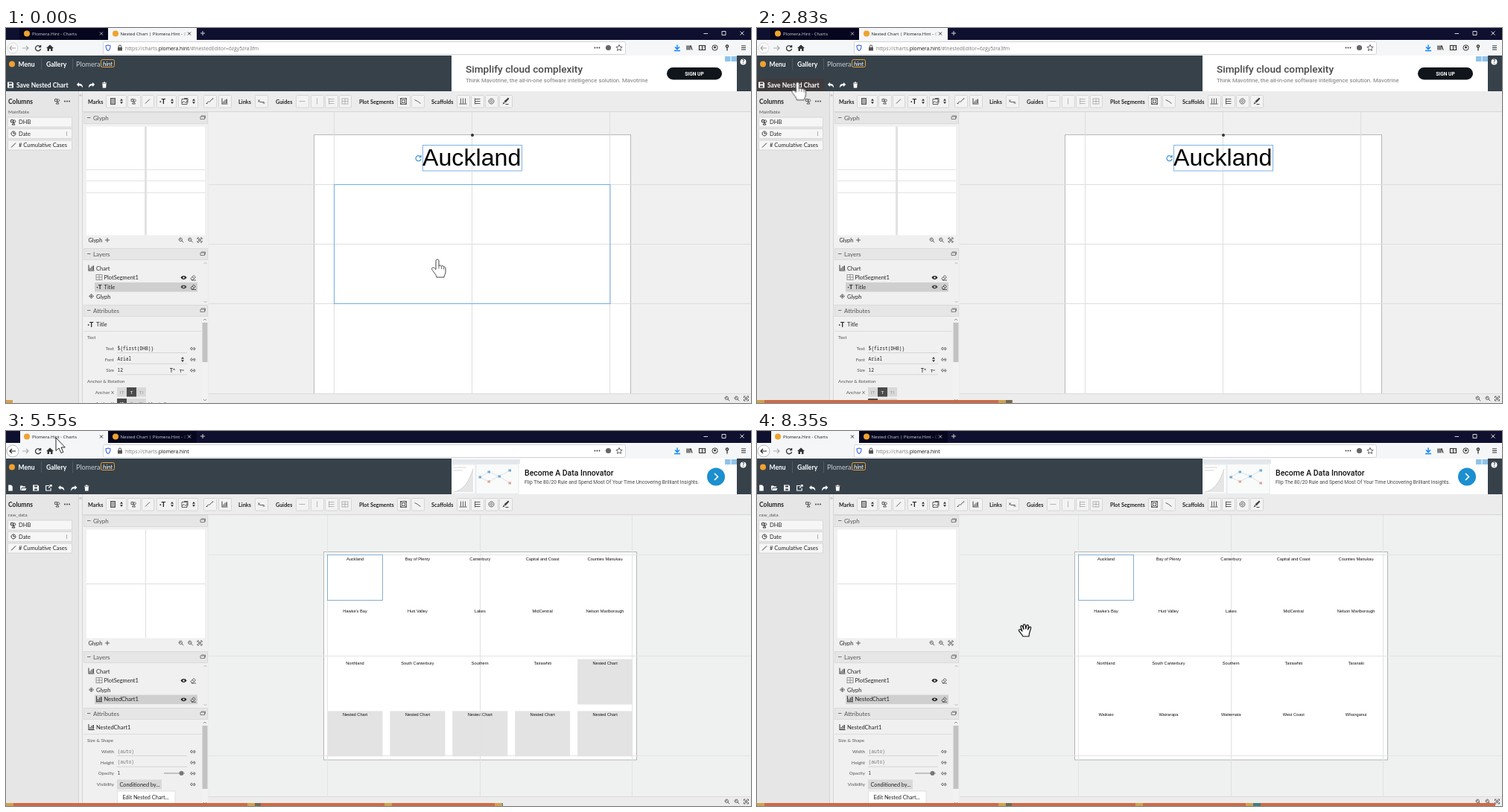
These frames come from a looping animation (1000 by 504 pixels, 8430 ms). An HTML page:

```html
<!DOCTYPE html>
<html lang="en">
<head>
<meta charset="utf-8">
<title>Nested chart editor</title>
<style>
html, body { margin: 0; width: 100%; height: 100%; overflow: hidden; background: #efefef; }
#stage { position: absolute; left: 0; top: 0; width: 1000px; height: 504px; overflow: hidden; }
svg { display: block; }
text { font-family: Lato, sans-serif; white-space: pre; }
.b { font-weight: 700; }
.o { font-family: "Open Sans", sans-serif; }
.r { font-family: Roboto, sans-serif; }
.rm { font-family: Roboto, sans-serif; font-weight: 500; }
.m { font-family: "Noto Sans Mono", monospace; }
.a { font-family: "Liberation Sans", Arial, sans-serif; }

/* hard switches */
.sw { animation: 8.43s step-end infinite; }
.editor { animation-name: editor; }
.overview { animation-name: overview; }
.plot { animation-name: plot; }
.saveHover { animation-name: saveHover; }
.galleryHover { animation-name: galleryHover; }
.tabHover { animation-name: tabHover; }
.click { animation-name: click; }
.chevron { animation-name: chevron; }
.waiting { animation-name: waiting; }
.filled { animation-name: filled; }
.pointer { animation-name: pointer; }
.grab { animation-name: grab; }
.arrow { animation-name: arrow; }
@keyframes editor { 0% { visibility: visible } 64.77%, 100% { visibility: hidden } }
@keyframes overview { 0% { visibility: hidden } 64.77%, 100% { visibility: visible } }
@keyframes plot { 0% { visibility: visible } 10.6%, 100% { visibility: hidden } }
@keyframes saveHover { 0%, 34.8%, 100% { visibility: hidden } 17.6% { visibility: visible } }
@keyframes galleryHover { 0%, 56.1%, 100% { visibility: hidden } 36.4% { visibility: visible } }
@keyframes tabHover { 0%, 64.77%, 100% { visibility: hidden } 58.9% { visibility: visible } }
@keyframes click { 0%, 64.77%, 100% { visibility: hidden } 62.9% { visibility: visible } }
@keyframes chevron { 0%, 78.9%, 100% { visibility: hidden } 75.9% { visibility: visible } }
@keyframes waiting { 0%, 66.8%, 100% { visibility: hidden } 64.77% { visibility: visible } }
@keyframes filled { 0% { visibility: hidden } 66.8%, 100% { visibility: visible } }
@keyframes pointer { 0%, 17.6% { visibility: visible } 10.6%, 56.1%, 100% { visibility: hidden } }
@keyframes grab { 0%, 13.1% { visibility: hidden } 10.6%, 80.8%, 100% { visibility: visible } }
@keyframes arrow { 0%, 17.6%, 80.8%, 100% { visibility: hidden } 13.1%, 56.1% { visibility: visible } }

#cursor { animation: travel 8.43s ease-in-out infinite; }
@keyframes travel {
  0%, 5.93% { transform: translate(579px, 311px) }
  18.98%, 32.03% { transform: translate(54px, 75px) }
  39.7%, 53.4% { transform: translate(59px, 48px) }
  61.1% { transform: translate(67px, 9px) }
  73.1% { transform: translate(67px, 9px); animation-timing-function: ease-in }
  77.7% { transform: translate(175px, 73px); animation-timing-function: linear }
  82.9% { transform: translate(338px, 247px); animation-timing-function: ease-out }
  86.6%, 100% { transform: translate(360px, 268px) }
}
#bar {
  position: absolute; left: 0; top: 500px; height: 4px;
  background: linear-gradient(90deg, #d2a04c 10px, #cd6a47 10px 324px, #d2a04c 324px 334px,
    #6f6a50 334px 342px, #cd6a47 342px 508px, #d2a04c 508px 518px, #cd6a47 518px 656px,
    #d2a04c 656px 666px, #3f7f7c 666px 676px, #cd6a47 676px) 0 0 / 1000px 4px no-repeat;
  animation: progress 8.43s steps(108, jump-start) infinite;
}
@keyframes progress { from { width: 0 } to { width: 1000px } }
</style>
</head>
<body>
<div id="stage"><div id="bar"></div></div>
<script>
const rect = (x, y, w, h, fill, stroke = 'none', rx = 0) =>
  `<rect x="${x}" y="${y}" width="${w}" height="${h}" rx="${rx}" fill="${fill}" stroke="${stroke}"/>`;
const text = (x, y, s, size, fill = '#222', cls = '', anchor = 'start') =>
  `<text x="${x}" y="${y}" font-size="${size}" fill="${fill}" class="${cls}" text-anchor="${anchor}">${s}</text>`;
const dot = (x, y, r, fill, stroke = 'none') => `<circle cx="${x}" cy="${y}" r="${r}" fill="${fill}" stroke="${stroke}"/>`;
const line = (d, c, w = 1, fill = 'none') => `<path d="${d}" stroke="${c}" stroke-width="${w}" fill="${fill}"/>`;
const solid = (d, c) => `<path d="${d}" fill="${c}"/>`;
const at = (x, y, s) => `<g transform="translate(${x} ${y})">${s}</g>`;
const group = (cls, ...parts) => `<g class="sw ${cls}">${parts.join('')}</g>`;
const each = (list, fn) => list.map(fn).join('');

const outlines = {
  back: 'M4 0H-4M-1-3L-4 0L-1 3', forward: 'M-4 0H4M1-3L4 0L1 3',
  reload: 'M3-2A3.6 3.6 0 1 0 3.6 1M3.6-4V-1.4H1', close: 'M-2-2L2 2M2-2L-2 2',
  plus: 'M-3 0H3M0-3V3', menu: 'M-3-2.5H3M-3 0H3M-3 2.5H3',
  shield: 'M0-3.5L3-2.5C3 1 2 3 0 4C-2 3-3 1-3-2.5Z', star: 'M0-4L1.2-1.3L4-1L2 1L2.5 3.8L0 2.4L-2.5 3.8L-2 1L-4-1L-1.2-1.3Z',
  down: 'M0-4V2M-3-1L0 2L3-1M-4 4H4', books: 'M-3-3V3M-1-3V3M1-3V3M2-3L4 3', side: 'M-4-3H4V3H-4ZM0-3V3M2-1H3',
  key: 'M0-3.5A1.6 1.6 0 1 1-.1-3.5M0-.4V4', restore: 'M-3-1.5H2.5V2H-3ZM-2-2.5H3.5V1',
  zoom: 'M1.5-1A2.2 2.2 0 1 1 1.4-1.4M.9.9L3.3 3.3M-2-1H.2', fit: 'M-3-1V-3H-1M1-3H3V-1M3 1V3H1M-1 3H-3V1M-1.2-1.2H1.2V1.2H-1.2Z',
  link: 'M-1-1.5A1.6 1.6 0 1 0-1 1.3M.6-1.3A1.6 1.6 0 1 1 .6 1.5M-2 0H2', eraser: 'M-3 1L1-3L3.4-.6L0 3H-2ZM-1-1L1.5 1.2M-2 3.5H4',
  shapes: 'M-3.5-3H-.5V0H-3.5ZM2.8-1.5A1.6 1.6 0 1 1 2.7-1.8M-2 3.5L0 .5L2 3.5Z', slash: 'M-3 3L3-3',
  clock: 'M3 0A3 3 0 1 1 3-.1M0-2V0H2', path: 'M-4 3C-2-2 0 3 1-1L4-3M-5 3H-3M3-3.5H5',
  scatter: 'M-4-2L-2 1H4M-4 1L-2-2M2 2.5H5', diamond: 'M0-3L3 0L0 3L-3 0ZM-2 0H2M0-2V2',
  hGuide: 'M-4 0H4', vGuide: 'M0-4V4', grid: 'M-4-3.5H4M-4 0H4M-4 3.5H4M-4-4V4M0-4V4M4-4V4', rows: 'M-3-4V4M-3-3H4M-3 0H4M-3 3H4',
  cols: 'M-5 3.5H5M-3-4V3M0-4V3M3-4V3', curve: 'M-4-2L0 0L4 3', rings: 'M3.5 0A3.5 3.5 0 1 1 3.5-.1M1.5 0A1.5 1.5 0 1 1 1.5-.1',
  box: 'M-4-4H4V4H-4ZM-2-2H2V2H-2ZM-4-4L-2-2M4-4L2-2M-4 4L-2 2M4 4L2 2',
  picture: 'M-4-3H3V4H-4ZM-4 2L-1 0L1 2L3 0M-1-4H4V2', send: 'M1-3H-3.500V3.500H3V0M0 0L4-4M1.500-4H4V-1.500'
};
const solids = {
  home: 'M-5 0L0-4.5L5 0H3.5V4H1V1H-1V4H-3.5V0Z', lock: 'M-3-.5H-2V-2A2 2 0 0 1 2-2V-.5H3V4H-3ZM-1-.5H1V-2A1 1 0 0 0-1-2Z',
  save: 'M-4-4H2.5L4-2.5V4H-4ZM-2-3V-1H2V-3ZM-2 1V3H2V1Z', undo: 'M-4.2-.6L-1-3.6V-1.8C3-1.8 4.4 1 4 4C3 1.5 1 .8-1 .8V2.6Z',
  redo: 'M4.2-.6L1-3.6V-1.8C-3-1.8-4.4 1-4 4C-3 1.5-1 .8 1 .8V2.6Z', trash: 'M-3-3H-1V-4H1V-3H3V-2H-3ZM-2.6-1.4H2.6L2.2 4H-2.2Z',
  file: 'M-2.8-4H.8L2.8-2V4H-2.8Z', open: 'M-4-3H-1L0-2H3V-.5H-2L-3.4 3H-4ZM-1.5.4H4.5L3 3.4H-3Z',
  chart: 'M-4-4H-3V3H4V4H-4ZM-2 0H-1V2.4H-2ZM0-2H1V2.4H0ZM2-3H3.4V2.4H2Z',
  brush: 'M3.500-5L5-3.500L0 2L-2 0ZM-2.500.8L-.6 2.600L-4 4ZM0 3.500H4V4.500H0Z',
  sort: 'M0-3.4L2-.7H-2ZM0 3.4L2 .7H-2Z', eye: 'M-4 0C-2-3.2 2-3.2 4 0C2 3.2-2 3.2-4 0M-1.2 0A1.2 1.2 0 1 0 1.2 0A1.2 1.2 0 1 0-1.2 0Z'
};
const icon = (name, x, y, c = '#444', w = .85) => at(x, y,
  solids[name] ? `<path d="${solids[name]}" fill="${c}" fill-rule="evenodd"/>` : line(outlines[name], c, w));
const dots = (x, y, c = '#333') => each([-3, 0, 3], d => dot(x + d, y, .9, c));
const mark = (x, y) => dot(x, y, 4, '#efa22f');

const site = 'plomera.hint';
const tabTitle = 'Plomera.Hint - Charts';

function tabs(first) {
  const ink = on => on ? '#1a1a24' : '#d4d4dc';
  return rect(first ? 19 : 137, 0, first ? 118 : 119, 16.5, '#f5f6f7') +
    mark(28, 7.5) + mark(147, 7.5) +
    text(35, 10, tabTitle, 6, ink(first), 'o') +
    text(153.5, 10, 'Nested Chart | Plomera.Hint - <tspan opacity=".4">C</tspan>', 6, ink(!first), 'o') +
    icon('close', 128, 7.5, ink(first)) + icon('close', 246, 7.5, ink(!first)) +
    (first ? dot(9, 27, 8, '#fff', '#bbb') : dot(9, 27, 7, '#f9f9fa', '#ddd')) +
    icon('back', 9, 27, first ? '#222' : '#aaa', 1.2) +
    text(160, 29.5, `https://charts.<tspan fill="#111">${site}</tspan>${first ? '' : '/#!nestedEditor=6zgy5zra3fm'}`, 6.82, '#777', 'o');
}

function chrome() {
  return rect(0, 0, 1000, 17, '#0f1030') + rect(18, 0, 238, 16, '#06061f') + rect(0, 16, 1000, 21, '#f5f6f7') +
    icon('plus', 264, 7, '#eee') + line('M936.5 7.5H942M961 4.5H966V9.5H961ZM985.5 4.5L990.5 9.5M990.5 4.5L985.5 9.5', '#eee', .9) +
    icon('forward', 26, 27, '#aaa', 1.2) + icon('reload', 43, 27, '#333', 1.3) + icon('home', 59, 27, '#333') +
    rect(130.5, 18.5, 701, 17, '#fff', '#d4d4d8', 2) + icon('shield', 137, 26.5, '#3a64d8', 1.1) + icon('lock', 153, 26.5, '#555') +
    dots(793.5, 26.5) + dot(808.5, 26.5, 3.6, '#666') + icon('star', 823, 26.5, '#444') +
    icon('down', 901, 26.5, '#0a84ff', 1.4) + icon('books', 917, 26.5, '#333', 1.2) + icon('side', 934.5, 26.5, '#333', 1.2) +
    dot(951.5, 26.5, 3.6, 'none', '#333') + dot(951.5, 26, 1.5, '#333') + icon('key', 968, 26.5, '#333', 1.3) + icon('menu', 990, 26.5, '#333', 1.2);
}

function header() {
  return rect(0, 37, 1000, 48, '#36414a') + mark(8, 48.5) + text(16.5, 51.5, 'Menu', 8.5, '#fff', 'b') +
    group('galleryHover', rect(47, 37, 43, 22, '#00a7e1')) +
    text(54, 51.5, 'Gallery', 8.6, '#fff', 'b') + line('M47.5 41V56M89.5 41V56', '#56616a', .8) +
    text(94, 52, 'Plomera.', 9, '#c9d0d4') + rect(127.5, 42.5, 18, 10, 'none', '#e7a13a', 2) +
    `<text x="130" y="51" font-size="8" fill="#fff" font-style="italic">hint</text>` +
    dot(989.5, 45.5, 4, '#fff') + text(989.5, 48.2, '?', 7, '#333', 'b', 'middle');
}

function panels() {
  const head = (y, s) => rect(104.5, y, 166, 15, '#e6e6e6', '#dadada') + line(`M109 ${y + 7}H113.5`, '#666', .9) +
    text(117, y + 10.4, s, 8, '#555') + icon('restore', 264, y + 7, '#666', .8);
  const fields = [[126.5, 'DHB', 'shapes'], [142, 'Date', 'clock'], [157.5, '# Cumulative Cases', 'slash']];
  return rect(0, 85, 1000, 419, '#ececec') + rect(0, 85, 97, 419, '#e6e6e6') + rect(97, 85, 5, 419, '#efefef') +
    line('M97.5 85V504M102.5 85V504', '#d4d4d4') + line('M98.5 91L100 89L101.5 91Z', '#999', .5) +
    text(3, 102, 'Columns', 8.5, '#222', 'b') + icon('shapes', 69, 98.5) + dots(82, 98.5) +
    each(fields, ([y, s, i]) => rect(2.5, y - 6.5, 86, 13, '#f6f6f6', '#d8d8d8') + icon(i, 10, y, '#333', 1) + text(17, y + 2.7, s, 7.55)) +
    each([-2, 0, 2], d => dot(81.5, 142 + d, .6, '#555')) +
    rect(103, 112, 168, 392, '#f0f0f0') + head(113.5, 'Glyph') + head(296.5, 'Layers') + head(372.5, 'Attributes') +
    rect(108, 132.5, 159, 146, '#fff') + text(110.5, 287.5, 'Glyph', 7.2) + icon('plus', 136, 285, '#444') +
    icon('zoom', 235, 285) + icon('zoom', 247.5, 285) + icon('fit', 260, 285) +
    line('M265.5 317L267.5 315L269.5 317M265.5 367L267.5 369L269.5 367', '#aaa', .8) +
    rect(263, 388, 8, 116, '#f2f2f2') +
    line('M265 393L267 391L269 393M265 499L267 501L269 499', '#777', .8) + line('M104 407.5H262', '#d8d8d8', .8);
}
const thumb = h => rect(263.5, 396, 7, h, '#c2c2c2');

function toolbar() {
  const labels = [[110, 'Marks'], [312, 'Links'], [362, 'Guides'], [474, 'Plot Segments'], [571, 'Scaffolds']];
  const buttons = [[134, 27], [163, 17, 'shapes'], [182, 16, 'slash'], [202, 26], [231, 26, 'picture'], [265, 17, 'path'],
    [285, 17, 'chart'], [334, 17, 'scatter'], [389, 17, 'hGuide'], [409, 17, 'vGuide'], [428, 17, 'rows'], [447, 16, 'grid'],
    [525, 17, 'box'], [544, 17, 'curve'], [605, 17, 'cols'], [624, 17, 'rows'], [643, 17, 'rings'], [662, 17, 'brush']];
  const guide = x => x > 380 && x < 470;
  return rect(103, 85, 897, 27.5, '#ececec') + line('M103 112.5H1000', '#d6d6d6') +
    each(labels, ([x, s]) => text(x, 101.5, s, 7.3, '#222', 'b')) +
    each(buttons, ([x, w, i]) => rect(x + .5, 90.5, w, 16.5, '#f3f3f3', '#d6d6d6', 1) +
      (i ? icon(i, x + (w > 20 ? 9 : w / 2), 98.5, guide(x) ? '#aaa' : '#444') : '') +
      (w > 20 ? icon('sort', x + 21, 98.5, '#333') : '')) +
    rect(140.5, 94.5, 6, 8, '#aaa', '#555') + text(206, 102, '·T', 9.5, '#222', 'b');
}

const layer = (x, y, s, i, tools) => icon(i, x - 6.5, y - .5, i === 'grid' ? '#777' : '#333', .7) + text(x, y + 2.5, s, 7.5) +
  (tools ? icon('eye', 238.5, y, '#222') + icon('eraser', 251, y, '#444') : '');
const selected = y => rect(119, y - 6.2, 138, 12.5, '#cfcfcf');
const prop = (y, label, value, under = true) => text(145, y, label, 6.2, '#555', '', 'end') + text(149.5, y - .3, value, 6.25, '#222', 'm') +
  (under ? line(`M149 ${y + 3.5}H243`, '#cfcfcf', .8) : '') + icon('link', 251, y - 2, '#444', .8);
const choice = (y, on) => rect(149, y, 39, 12.5, '#d9d9d9') + rect(149 + 13 * on, y, 13, 12.5, '#4a4a4a') +
  each(['IT', 'T', 'TI'], (s, i) => text(155.5 + 13 * i, y + 9, s, 6.5, i === on ? '#fff' : '#999', '', 'middle'));

function editorPanels() {
  return icon('save', 6, 76.5, '#fff') + text(14, 79.7, 'Save Nested Chart', 8.45, '#fff', 'b') +
    icon('undo', 99, 76.5, '#fff') + icon('redo', 115, 76.5, '#fff') + icon('trash', 132, 76.5, '#fff') +
    text(3, 115, 'MainTable', 6.4, '#555') + thumb(53) +
    rect(186, 132.5, 3, 146, '#e2e2e2') + line('M108 190.5H267M108 205.5H267M108 221.5H267', '#e0e0e0', .9) +
    selected(348.2) + layer(121, 323, 'Chart', 'chart') + layer(131.5, 335.5, 'PlotSegment1', 'grid', 1) +
    text(121.5, 351.2, '·T', 8, '#222', 'b') + text(131.5, 350.7, 'Title', 7.5) + icon('eye', 238.5, 348) + icon('eraser', 251, 348) +
    layer(121, 361, 'Glyph', 'diamond') +
    text(109.5, 401.5, '·T', 9, '#222', 'b') + text(121, 401.3, 'Title', 7.5) + text(109, 418, 'Text', 6.2, '#555') +
    prop(433, 'Text', '${first(DHB)}') + prop(447.7, 'Font', 'Arial') + prop(462.3, 'Size', '12') +
    icon('sort', 237, 445.5, '#333') + text(220, 462.5, 'T˄', 6.5, '#333', 'b') + text(233, 462.5, 'T˅', 5.6, '#333', 'b') +
    text(109, 477, 'Anchor &amp; Rotation', 6.2, '#555') + text(145, 491.7, 'Anchor X', 6.2, '#555', '', 'end') +
    choice(483, 1) + choice(498, 0) +
    text(145, 506.5, 'Anchor Y', 6.2, '#555', '', 'end') + text(191, 506.5, 'Margin 0', 6.2, '#555');
}

function editorCanvas() {
  return rect(272, 113, 728, 378, '#f0f0f0') + rect(413.5, 143.5, 425, 360, '#fff', '#b8b8b8') +
    line('M440.5 113V491M625.5 113V491M810.5 113V491M272 210.5H1000M272 290.5H1000M272 370.5H1000', '#dedede') +
    group('plot', rect(440.5, 210.5, 370.5, 160, 'none', '#74ace4')) +
    dot(626, 144, 2, '#333') + rect(559.5, 157.5, 133, 34.5, '#fff', '#7fb3e6') + line('M625.5 158V192', '#e2e2e2') +
    text(559, 185.4, 'Auckland', 32.2, '#000', 'a') + icon('reload', 553.5, 175, '#3f96d8', 1.2);
}

function editorAd() {
  return rect(598, 37, 383, 48, '#fff') + text(617, 60, 'Simplify cloud complexity', 13.65, '#484848', 'rm') +
    text(617, 73, 'Think Mavotrine, the all-in-one software intelligence solution. Mavotrine', 7.75, '#777', 'r') +
    rect(887, 53, 74, 16.5, '#0f151b', 'none', 8.2) + text(924, 63.7, 'SIGN UP', 6.6, '#fff', 'r b', 'middle');
}

function overviewPanels() {
  const tools = ['file', 'open', 'save', 'send', 'undo', 'redo', 'trash'];
  return each(tools, (n, i) => icon(n, 6 + i * 17.05, 76.5, '#fff', 1.1)) + text(3, 115, 'raw_data', 6.4, '#555') + thumb(85) +
    line('M187.5 132.5V278M108 205.5H267', '#dcdcdc', .9) +
    selected(360.8) + layer(121, 323, 'Chart', 'chart') + layer(131.5, 335.5, 'PlotSegment1', 'grid', 1) +
    layer(121, 348.3, 'Glyph', 'diamond') + layer(131.5, 360.8, 'NestedChart1', 'chart', 1) +
    icon('chart', 114.5, 398, '#333') + text(121, 401.3, 'NestedChart1', 7.5) + text(109, 418, 'Size &amp; Shape', 6.2, '#555') +
    prop(433, 'Width', '<tspan fill="#777">(auto)</tspan>') + prop(447.7, 'Height', '<tspan fill="#777">(auto)</tspan>') +
    prop(462.3, 'Opacity', '1', false) + line('M212 460H240', '#888', .9) + dot(235.5, 460, 3, '#777') +
    prop(477, 'Visibility', '', false) + rect(149, 468.5, 60, 13, '#d9d9d9') + text(152.5, 477.7, 'Conditioned by...', 7.3) +
    rect(149.5, 484, 77.5, 22, '#fff', '#e0e0e0') + text(156.5, 494.7, 'Edit Nested Chart...', 7.3);
}

const places = ['Auckland', 'Bay of Plenty', 'Canterbury', 'Capital and Coast', 'Counties Manukau',
  'Hawke\'s Bay', 'Hutt Valley', 'Lakes', 'MidCentral', 'Nelson Marlborough',
  'Northland', 'South Canterbury', 'Southern', 'Tairawhiti', 'Taranaki',
  'Waikato', 'Wairarapa', 'Waitemata', 'West Coast', 'Whanganui'];

function overviewCanvas() {
  const ready = 14;
  const x = i => 431.5 + i % 5 * 83.9;
  const y = i => 167 + Math.floor(i / 5) * 69.8;
  const label = (i, s) => text(x(i) + 37, y(i) + 7, s, 5.65, '#111', 'a', 'middle');
  const late = places.slice(ready);
  return rect(272, 113, 728, 378, '#eff0f0') + rect(426.5, 162.5, 420, 279.5, '#fff', '#b4b4b4') +
    line('M431.5 113V491M840.5 113V491M272 166.5H1000M272 302.5H1000M272 436.5H1000', '#e2e5e5') +
    group('waiting', each(late, (s, i) => rect(x(i + ready), y(i + ready), 74, 61, '#e3e3e3') + label(i + ready, 'Nested Chart'))) +
    line('M636.5 113V491', '#dfe2e2') +
    each(places.slice(0, ready), (s, i) => label(i, s)) + group('filled', each(late, (s, i) => label(i + ready, s))) +
    rect(431.5, 166.5, 74, 61, 'none', '#86aed0');
}

function overviewAd() {
  const nodes = [[636, 62], [648, 55], [648, 68], [662, 61], [676, 53], [676, 70]];
  return rect(598, 37, 383, 48, '#fff') + rect(598, 38, 92, 6, '#e4e8ec') + rect(599, 45, 31, 39, '#fff', '#dfe1e3') +
    solid('M601 82C612 80 620 72 627 51V82Z', '#e6e6e6') + line('M601 82C612 80 620 72 627 51M601 49H618M601 53H613', '#bbb', .6) +
    rect(631, 44.5, 57, 40, '#f9fafa', '#e6eaed') +
    line('M636 62L648 55L662 61L676 53M636 62L648 68L662 61L676 70', '#c6d2dc', .6) +
    each(nodes, ([x, y], i) => rect(x - 1.5, y - 1.5, 3.5, 3, i % 3 === 2 ? '#e0a48e' : '#6eaad4')) +
    text(696, 59.5, 'Become A Data Innovator', 10.5, '#111', 'rm') +
    text(696, 71, 'Flip The 80/20 Rule and Spend Most Of Your Time Uncovering Brilliant Insights.', 6.7, '#444', 'r') +
    dot(953, 61.5, 12, '#1c8fd0') + line('M951 57L955.5 61.5L951 66', '#fff', 1.6);
}

const adCorner = rect(965, 38, 7.5, 7, '#8fc3ea') + rect(973.5, 38, 7.5, 7, '#8fc3ea');
const footer = rect(272, 491, 728, 13, '#ececec') + line('M272 491.5H1000', '#d8d8d8', .8) +
  icon('zoom', 968, 498) + icon('zoom', 981, 498) + icon('fit', 993.5, 498);

const cursor = `<g id="cursor" stroke-linejoin="round">` +
  group('pointer', line('M-2 2C-2-.6 2-.6 2 2V9C2 7.6 5.4 7.4 5.4 9.6C5.6 8.2 8.6 8.2 8.6 10.4C9 9.4 11 9.8 11 11.6V17C11 20 9 21 9 24H-1C-1 21-6 16-7.4 13.2C-8 11-5 10-3.6 12L-2 13.6Z', '#333', .9, '#fff') +
    line('M2 9V12.5M5.4 10V13M8.6 11V13.5', '#333', .7)) +
  group('grab', line('M-3 8C-5 4-8 2-8.5 0C-8.6-1.8-6.6-2-5.5-.5L-4 1L-6-4.5C-6.4-6.6-4.2-7-3.6-5.2L-2-1.5L-2.6-6.5C-2.6-8.6-.2-8.6.2-6.6L.8-2L1.8-6.4C2.4-8.2 4.6-7.6 4.3-5.6L3.6-1L5.4-4C6.4-5.6 8.2-4.6 7.6-3L5.4 4.5L5 8Z', '#111', 1.2, '#fff')) +
  group('arrow', line('M0 0V17.5L4 14L7 20.5L9.8 19.3L7 13H12.3Z', '#111', .9, '#fff')) + '</g>';

const scene = [
  chrome(),
  group('tabHover', rect(18, 0, 119, 16, '#2c2c40')),
  group('editor', tabs(false)), group('overview', tabs(true)),
  group('chevron', line('M775.5 25.5L778.5 28.5L781.5 25.5', '#666', .9)),
  header(), group('saveHover', rect(0, 68, 90, 17, '#3f3b3d')),
  panels(), toolbar(),
  group('editor', editorPanels(), editorCanvas(), editorAd()),
  group('overview', overviewPanels(), overviewCanvas(), overviewAd()),
  adCorner, footer,
  group('click', '<circle cx="67" cy="11" r="12" fill="#f0d818" opacity=".65"/>'),
  cursor
].join('');

document.getElementById('stage').insertAdjacentHTML('afterbegin',
  `<svg xmlns="http://www.w3.org/2000/svg" width="1000" height="504" viewBox="0 0 1000 504">${scene}</svg>`);
</script>
</body>
</html>
```
